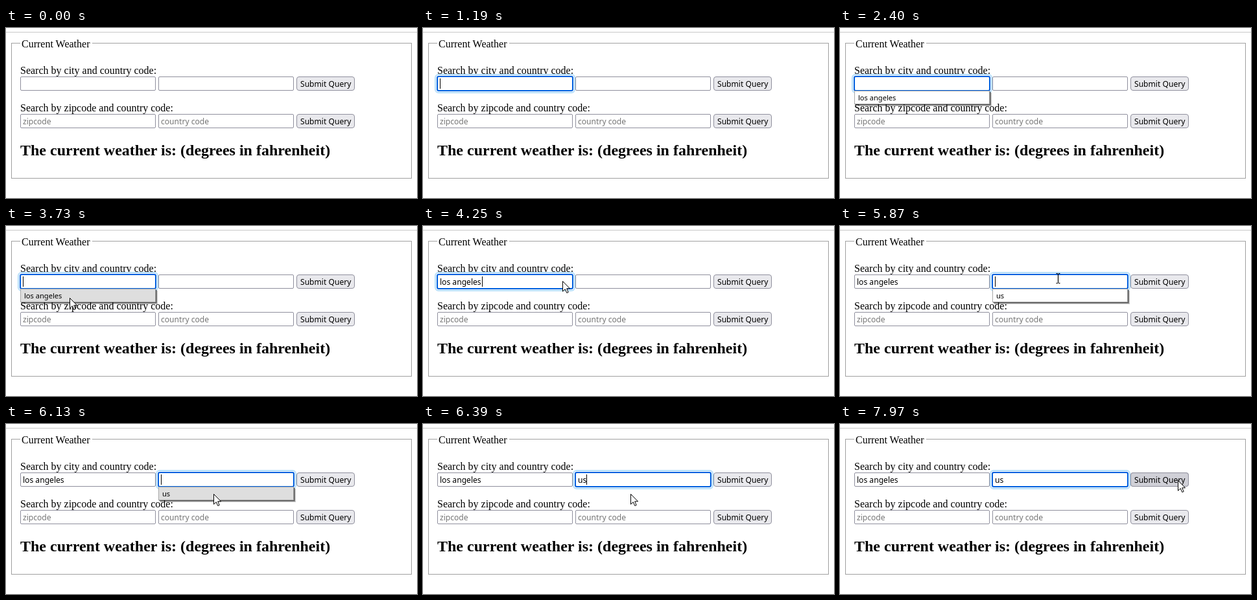
These frames come from a looping animation (634x263 px, 8000 ms). An HTML page:

```html
<!DOCTYPE html>
<html lang="en">
<head>
<meta charset="utf-8">
<title>Current Weather</title>
<style>
  html, body { margin: 0; width: 100%; height: 100%; overflow: hidden; background: #fff; }
  svg { display: block; width: 634px; height: 263px; }
  text { font: 16px "Liberation Serif", "Times New Roman", serif; }
  .title { font-size: 24px; font-weight: bold; }
  .ui { font: 12.1px "Noto Sans", "Open Sans", sans-serif; }
  .hint { fill: #757575; }
  .item { font-size: 11.1px; }
  .box { fill: #fff; stroke: #8f8f9d; }
  .btn { fill: #e9e9ed; stroke: #8f8f9d; }
  .hot { fill: #d0d0d7; }
</style>
</head>
<body>
<svg id="stage" viewBox="0 0 634 263"></svg>
<script>
const LOOP = 8000, TICK = 130, BLINK = 525;
const FIELD_W = 209, FIELD_H = 22, ROW = 75, ROW_GAP = 58;
const CITY_X = 22, CODE_X = 235, BUTTON_X = 448;
const FOCUS_CITY = 1190, PICK_CITY = 3990, FOCUS_CODE = 4810, PICK_CODE = 6390;
const stage = document.getElementById('stage');

function add(tag, attrs, parent = stage, content = '') {
  const el = document.createElementNS('http://www.w3.org/2000/svg', tag);
  for (const k in attrs) el.setAttribute(k, attrs[k]);
  el.textContent = content;
  parent.appendChild(el);
  return el;
}
const group = (parent) => add('g', {}, parent);
const label = (x, y, str, cls = '', parent = stage) => add('text', { x, y, class: cls }, parent, str);
const fill = (x, y, width, height, color, parent = stage) =>
  add('rect', { x, y, width, height, fill: color }, parent);
// Outline whose outer edge matches the given box
const frame = (x, y, width, height, rest, parent = stage, line = 1) =>
  add('rect', {
    x: x + line / 2, y: y + line / 2, width: width - line, height: height - line,
    'stroke-width': line, ...rest
  }, parent);

const play = (el, keys) => el.animate(keys, { duration: LOOP, iterations: Infinity });

// Visible only from start to end, with hard cuts
function show(el, start, end = LOOP) {
  const key = (t, opacity) => ({ offset: t / LOOP, opacity, easing: 'steps(1, end)' });
  play(el, [key(0, 0), key(start, 1), key(end, 0), key(LOOP, 0)]);
  return el;
}

function caret(x, start, end) {
  for (let t = start; t < end; t += 2 * BLINK)
    show(fill(x, 78, 1, 16, '#000'), t, Math.min(t + BLINK, end));
}

function field(x, y, hint) {
  frame(x, y, FIELD_W, FIELD_H, { class: 'box', rx: 1.5 });
  return label(x + 4, y + 16, hint, 'ui hint');
}
function button(x, y, cls = '', parent = stage) {
  frame(x, y, 90, FIELD_H, { class: 'btn ' + cls, rx: 3.5 }, parent);
  label(x + 6, y + 16, 'Submit Query', 'ui', parent);
}

// Blue edge, white gap and pale halo
function focusRing(x) {
  const g = group();
  const ring = (out, line, stroke) => frame(x - out, ROW - out, FIELD_W + 2 * out, FIELD_H + 2 * out,
    { fill: 'none', stroke, rx: out + 1 }, g, line);
  ring(4, 2, '#b3ddf9');
  ring(2, 1, '#fff');
  ring(1, 2, '#0060df');
  return g;
}

function popup(x, str, open, hover, pick) {
  const y = ROW + FIELD_H, h = 21, g = group();
  for (let i = 3; i > 0; i--) fill(x + i, y + i, FIELD_W, h, `rgb(0 0 0 / ${.5 - i * .1})`, g);
  frame(x, y, FIELD_W, h, { fill: '#fff', stroke: '#a8a8a8' }, g);
  show(fill(x + 1, y + 1, FIELD_W - 2, h - 2, '#dedede', g), hover);
  label(x + 6, y + 15, str, 'ui item', g);
  // Half faded for the last tick
  const veil = group();
  veil.setAttribute('opacity', .5);
  veil.appendChild(g.cloneNode(true));
  show(veil.firstChild, pick - TICK, pick);
  show(g, open, pick - TICK);
}

// Page
fill(0, 6, 634, 1, '#c9c9c9');
frame(8, 23, 618, 210, { fill: 'none', stroke: '#a0a0a0' });
fill(22, 20, 111, 8, '#fff');
label(24, 30, 'Current Weather');
label(22, 197, 'The current weather is: (degrees in fahrenheit)', 'title');

// Form
const [cityHint, codeHint] = ['city', 'zipcode'].map((name, i) => {
  const y = ROW + i * ROW_GAP;
  label(22, y - 4, `Search by ${name} and country code:`);
  button(BUTTON_X, y);
  return [field(CITY_X, y, name), field(CODE_X, y, 'country code')];
})[0];
show(cityHint, 0, PICK_CITY);
show(codeHint, 0, PICK_CODE);
show(label(CITY_X + 4, ROW + 16, 'los angeles', 'ui'), PICK_CITY);
show(label(CODE_X + 4, ROW + 16, 'us', 'ui'), PICK_CODE);

const hotButton = group();
button(BUTTON_X, ROW, 'hot', hotButton);
show(hotButton, 7310);

show(focusRing(CITY_X), FOCUS_CITY, FOCUS_CODE);
show(focusRing(CODE_X), FOCUS_CODE);

// Each click or key restarts the blink
caret(26, FOCUS_CITY, 1980);
caret(26, 1980, 2120);
caret(26, 2670, PICK_CITY);
caret(91, PICK_CITY, FOCUS_CODE);
caret(239, FOCUS_CODE, PICK_CODE);
caret(252, PICK_CODE, LOOP);

popup(CITY_X, 'los angeles', 2120, 3330, PICK_CITY);
popup(CODE_X, 'us', 5340, 6130, PICK_CODE);

// Pointers
const arrow = {
  d: 'M.5 .5V16.2L4.2 12.7L6.8 18.5L9.2 17.5L6.7 11.8H11.6Z',
  fill: '#fff', stroke: '#000'
};
const beam = {
  d: 'M.5 .5H3M4 .5H6.5M3.5 1V15M.5 15.5H3M4 15.5H6.5',
  fill: 'none', stroke: '#000', 'stroke-width': 1.2
};
// Go from a to b in whole ticks, then rest until end
function trip(shape, [ax, ay], [bx, by], start, ticks, end) {
  const el = add('path', shape);
  const a = `translate(${ax}px, ${ay}px)`, b = `translate(${bx}px, ${by}px)`;
  play(el, [
    { offset: 0, transform: a },
    { offset: start / LOOP, transform: a, easing: `steps(${ticks}, end)` },
    { offset: (start + ticks * TICK) / LOOP, transform: b },
    { offset: 1, transform: b }
  ]);
  show(el, start, end);
}
trip(arrow, [171, 61], [258, 33], 0, 2, 390);
trip(beam, [137, 70], [117, 75], 1450, 2, 2400);
trip(arrow, [104, 76], [98, 111], 3200, 1, 4250);
trip(arrow, [215, 85], [330, 61], 4250, 1, 4550);
trip(beam, [333, 70], [333, 73], 4550, 1, 6000);
trip(arrow, [327, 98], [320, 108], 6000, 1, 6920);
trip(arrow, [352, 104], [521, 87], 6920, 3, LOOP);
</script>
</body>
</html>
```
